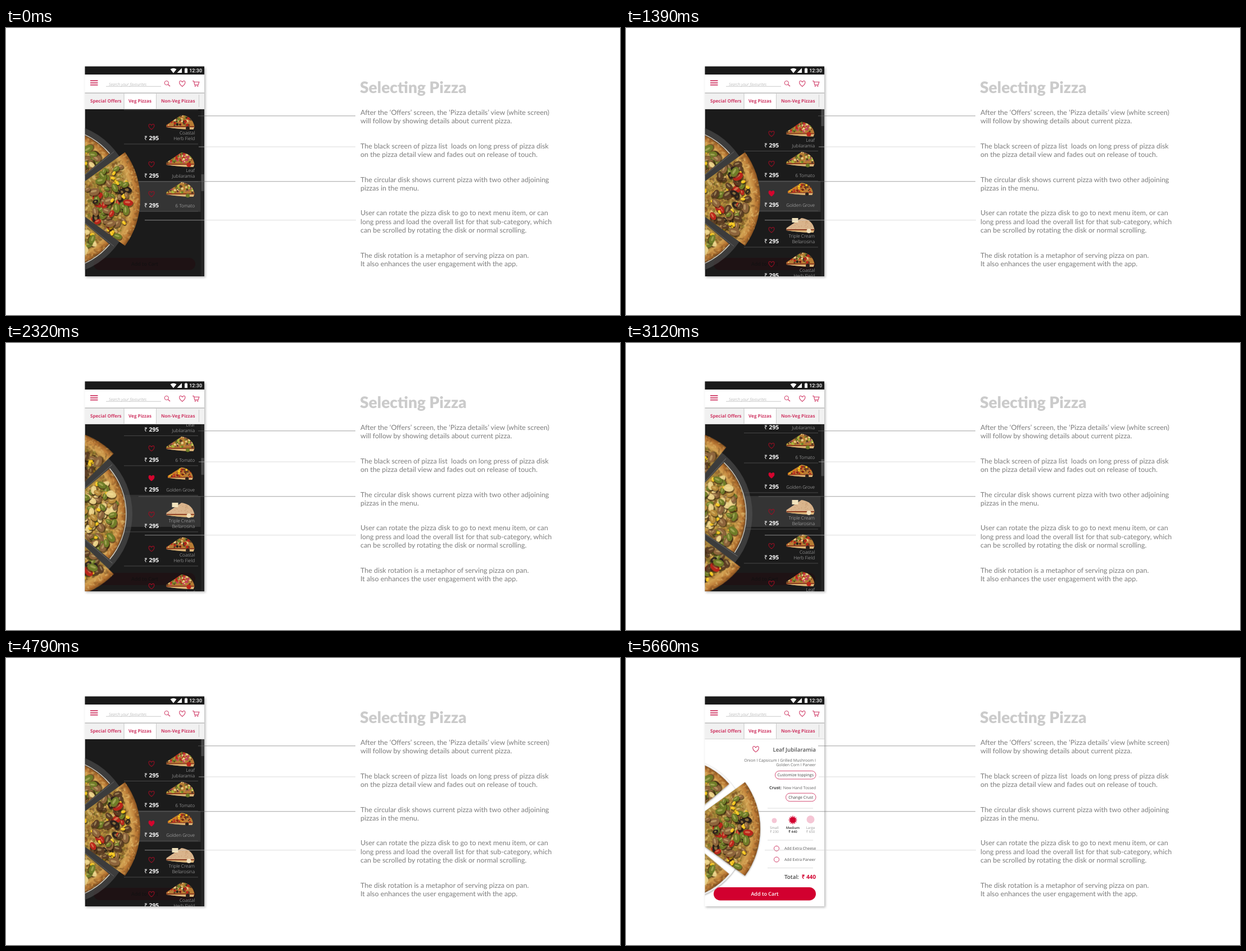
Animation, 1093 px wide and 512 px high, one loop 7.06 s. Source, as an HTML page with a canvas:

```html
<!DOCTYPE html>
<html lang="en">
<head>
<meta charset="utf-8">
<title>Selecting Pizza</title>
<style>
  html, body { margin: 0; width: 100%; height: 100%; overflow: hidden; background: #fff; }
  canvas { display: block; }
</style>
</head>
<body>
<canvas id="stage" width="1093" height="512"></canvas>
<script>
const LOOP = 7060;
const ctx = document.getElementById('stage').getContext('2d');
ctx.textRendering = 'geometricPrecision';
const CRIMSON = '#d2002f', PINK = '#d03a66', SANS = '"Open Sans", sans-serif';
const LEFT = 140.5, WIDTH = 212.5;
const rad = deg => deg * Math.PI / 180;
const smooth = u => { u = Math.min(1, Math.max(0, u)); return u * u * (3 - 2 * u); };

function random(seed) {
  return () => (seed = (seed * 16807) % 2147483647) / 2147483647;
}

// ---------- drawing helpers ----------
function text(str, x, y, size, color, weight = 400, align = 'left', family = SANS) {
  ctx.font = `${weight} ${size}px ${family}`;
  ctx.textAlign = align;
  ctx.fillStyle = color;
  ctx.fillText(str, x, y);
}
function rect(x, y, w, h, color) {
  ctx.fillStyle = color;
  ctx.fillRect(x, y, w, h);
}
function line(x1, y1, x2, y2, color, width = 1) {
  ctx.beginPath();
  ctx.moveTo(x1, y1);
  ctx.lineTo(x2, y2);
  ctx.strokeStyle = color;
  ctx.lineWidth = width;
  ctx.stroke();
}
function circle(x, y, r, fill, stroke) {
  ctx.beginPath();
  ctx.arc(x, y, r, 0, 7);
  paint(fill, stroke);
}
function pill(x, y, w, h, fill, stroke) {
  ctx.beginPath();
  ctx.roundRect(x, y, w, h, h / 2);
  paint(fill, stroke, .9);
}
function paint(fill, stroke, width = 1) {
  if (fill) { ctx.fillStyle = fill; ctx.fill(); }
  if (stroke) { ctx.strokeStyle = stroke; ctx.lineWidth = width; ctx.stroke(); }
}
function heart(x, y, w, color, filled) {
  const s = w / 2;
  ctx.beginPath();
  ctx.moveTo(x, y + s * .9);
  ctx.bezierCurveTo(x - s * 1.5, y - s * .1, x - s * .8, y - s * 1.5, x, y - s * .45);
  ctx.bezierCurveTo(x + s * .8, y - s * 1.5, x + s * 1.5, y - s * .1, x, y + s * .9);
  paint(filled && color, color, 1.1);
}

// ---------- pizza ----------
const OLIVE = '#2b221d', CORN = '#f3c51e', RED = '#b9261b', GREEN = '#6f7d28',
      SAUSAGE = '#5c3e25', MUSHROOM = '#8d643c', CHEESE = '#e6cd85';

function makeSlice(seed, radius, half, toppings) {
  const rnd = random(seed), canvas = document.createElement('canvas');
  canvas.width = radius + 4;
  canvas.height = radius * 2;
  const c = canvas.getContext('2d');
  c.translate(0, radius);
  c.beginPath();
  c.moveTo(0, 0);
  c.arc(0, 0, radius, -rad(half), rad(half));
  c.closePath();
  c.clip();
  const base = c.createRadialGradient(0, 0, 0, 0, 0, radius);
  [[0, '#a98a3e'], [.84, '#a9843a'], [.89, '#d3a252'], [.96, '#b97633'], [1, '#85501f']]
    .forEach(stop => base.addColorStop(...stop));
  c.fillStyle = base;
  c.fillRect(0, -radius, radius, radius * 2);

  const place = (near, far) => {
    const r = radius * (near + (far - near) * Math.sqrt(rnd()));
    const a = rad(half) * (rnd() * 2 - 1) * .96;
    return [r * Math.cos(a), r * Math.sin(a)];
  };
  const blob = (x, y, a, b, turn, color) => {
    c.beginPath();
    c.ellipse(x, y, a, b, turn, 0, 7);
    c.fillStyle = color;
    c.fill();
  };
  const specks = ['#6b4520', '#ecd283', '#94602a', '#757022', '#d9a848'];
  c.globalAlpha = .5;
  for (let i = 0; i < 700; i++)
    blob(...place(.2, .86), 1 + rnd() * 3, 1 + rnd() * 2, rnd() * 3, specks[i % 5]);
  c.globalAlpha = .3;
  for (let i = 0; i < 150; i++)
    blob(...place(.8, 1), 1 + rnd() * 3, 1 + rnd(), rnd() * 3, specks[i % 3]);
  c.globalAlpha = 1;
  for (let i = 0; i < 84; i++) {
    const color = toppings[i % toppings.length], [x, y] = place(.25, .86), turn = rnd() * 3;
    const size = color === CORN ? 4 : 5 + rnd() * 5;
    blob(x + 1, y + 2, size, size * .75, turn, 'rgba(45,28,10,.55)');
    blob(x, y, size, size * .65, turn, color);
    if (color === OLIVE) blob(x, y, size * .4, size * .28, turn, '#8a6f3c');
    else blob(x - 1, y - 1, size * .55, size * .2, turn, 'rgba(255,235,160,.35)');
  }
  return { canvas, radius, half };
}

const BIG = 142, SMALL = 125, SMALL_HALF = 40, SPACING = 80;
const garden = makeSlice(11, BIG, 36, [GREEN, CORN, MUSHROOM, GREEN, OLIVE, MUSHROOM, CORN, GREEN, RED]);
const spicy = makeSlice(29, BIG, 36, [SAUSAGE, CORN, MUSHROOM, GREEN, SAUSAGE, OLIVE, CORN, RED]);
const mild = makeSlice(53, SMALL, SMALL_HALF, [GREEN, CHEESE, MUSHROOM, CORN, CHEESE, GREEN, '#b78a3a']);
const slices = [mild, spicy, mild, spicy, mild, garden, mild];   // first one sits above the front

function disk(turn, dark) {
  ctx.save();
  ctx.translate(88, 305);
  ctx.shadowColor = dark ? 'transparent' : 'rgba(0,0,0,.4)';
  ctx.shadowBlur = 3;
  ctx.shadowOffsetY = 1;
  circle(0, 0, dark ? 137 : SMALL + 3, dark ? 'rgba(82,82,82,.6)' : '#fff');
  slices.forEach((slice, i) => {
    const angle = (i - 1) * SPACING - turn;
    if (Math.abs(angle) > 140) return;
    const big = slice !== mild;
    ctx.save();
    ctx.rotate(rad(angle));
    if (big && dark) {
      for (const side of [-1, 1]) {
        const a = rad(39 * side);
        line(40, 40 * Math.tan(a), 134 * Math.cos(a), 134 * Math.sin(a), '#606060');
      }
    }
    ctx.translate(big ? 9 : 0, 0);
    ctx.drawImage(slice.canvas, 0, -slice.radius);
    if (!big) {
      ctx.shadowColor = 'transparent';
      ctx.beginPath();
      ctx.arc(0, 0, SMALL + 1, -rad(SMALL_HALF), rad(SMALL_HALF));
      paint(null, dark ? '#d6d0c2' : '#eee', 1.5);
    }
    ctx.restore();
  });
  ctx.restore();
}

// ---------- menu list ----------
const leaf = { lines: ['Leaf', 'Jubilaramia'], colors: [RED, '#c8405f', CHEESE, GREEN, SAUSAGE] };
const tomato = { lines: ['6 Tomato'], colors: ['#a9b53c', CHEESE, '#a8485a', GREEN, SAUSAGE] };
const grove = { lines: ['Golden Grove'], colors: [RED, '#d07a20', SAUSAGE, CORN, '#7a2418'], liked: true };
const cream = { lines: ['Triple Cream', 'Bellarosina'], plain: true, colors: ['#c99c72', '#ddb892'] };
const coastal = { lines: ['Coastal', 'Herb Field'], colors: [GREEN, OLIVE, RED, CHEESE, SAUSAGE] };
const rows = [[leaf, 208.5], [tomato, 262], [grove, 315], [cream, 380], [coastal, 441],
              [leaf, 508], [tomato, 561]];

function thumbnail(item, x, y) {
  const rnd = random(item.lines[0].length * 97 + 5);
  ctx.save();
  ctx.translate(x, y);
  if (item === grove) ctx.scale(.9, .85);
  ctx.beginPath();
  ctx.moveTo(-25, 5);
  ctx.lineTo(2, -13);
  ctx.quadraticCurveTo(22, -10, 25, 8);
  ctx.lineTo(23, 13);
  ctx.quadraticCurveTo(0, 13, -25, 9);
  ctx.closePath();
  paint(item.plain ? '#d9b48c' : '#b87c34');
  ctx.save();
  ctx.clip();
  rect(-25, 7, 50, 2, '#8c3b20');
  rect(-25, 9, 50, 5, '#dcb578');
  for (let i = 0; i < 90; i++) {
    const px = -24 + rnd() * 46, py = 6 - rnd() * 19;
    circle(px, py, item.plain ? .8 : 1 + rnd() * 1.5, item.colors[i % item.colors.length]);
  }
  ctx.restore();
  if (item.plain) {
    rect(-15, -13, 11, 8, '#f2e3bd');
    circle(15, 10, 4, '#f0dfba');
  } else if (item !== leaf) {
    circle(13, 11, 3.5, item === tomato ? GREEN : OLIVE);
  } else {
    circle(15, 9, 4, RED);
  }
  ctx.restore();
}

function menuRow(item, y) {
  if (y < 110 || y > 490) return;
  heart(259, y - 20, 11, item.liked ? '#d4052e' : '#a00c22', item.liked);
  text('₹', 246, y + 4, 10.3, '#fff');
  text('295', 254.5, y + 4, 10.3, '#fff', 700);
  thumbnail(item, 310.5, y - 28);
  item.lines.forEach((name, i) =>
    text(name, 336, y + 4.4 - (item.lines.length - 1 - i) * 10.2, 8.2, '#c8c8c8', 300, 'right'));
  line(210, y + 11, 342, y + 11, '#484848');
}

const scrollKeys = [[130, 245], [790, 0], [1590, 0], [2250, 54], [3120, 59], [3590, -10.5], [4000, 0]];
function scrollAt(t) {
  const next = scrollKeys.findIndex(key => key[0] > t);
  if (next === 0) return scrollKeys[0][1];
  if (next < 0) return 0;
  const [t0, a] = scrollKeys[next - 1], [t1, b] = scrollKeys[next];
  return a + (b - a) * smooth((t - t0) / (t1 - t0));
}

function listView(t) {
  const scroll = scrollAt(t), progress = Math.max(0, scroll) / 245;
  rect(LEFT, 145, WIDTH, 298, '#1b1b1b');
  pill(156, 410, 181, 22, '#1e1214');
  text('Add to Cart', 247, 424, 8.8, '#131112', 600, 'center');
  rect(LEFT, 273, 206, 55, '#343434');
  rows.forEach(([item, y]) => menuRow(item, y - scroll));
  disk(320 * progress ** .917, true);
  rect(347, 145, 6, 298, '#242424');
  rect(347.5, 145 + 116 * progress ** .436, 5, 30, '#484848');
}

// ---------- detail view ----------
function detailView() {
  rect(LEFT, 145, WIDTH, 298, '#fff');
  disk(320, false);
  heart(231, 162.5, 12, PINK);
  text('Leaf Jubilaramia', 338, 166.5, 9.8, '#555', 600, 'right');
  text('Onion I Capsicum I Grilled Mushroom I', 338, 185, 7.1, '#666', 400, 'right');
  text('Golden Corn I Paneer', 338, 193.3, 7.1, '#666', 400, 'right');
  pill(265.5, 201.5, 72.5, 14.5, null, PINK);
  text('Customize toppings', 301.7, 211.2, 7, '#444', 400, 'center');
  text('Crust:', 255, 233.6, 7.4, '#444', 700);
  text('New Hand Tossed', 338, 233.6, 7, '#666', 400, 'right');
  pill(284.5, 241.2, 53.5, 14.5, null, PINK);
  text('Change Crust', 311.2, 251, 7, '#444', 400, 'center');
  [268, 325, 374.5].forEach(y => line(252, y, 333, y, '#ddd'));

  circle(264, 290, 4.5, '#f5c6d5');
  circle(328.5, 288, 7, '#f5c6d5');
  circle(297, 289, 5.6, CRIMSON);
  for (let a = 0; a < 360; a += 30)
    circle(297 + 6.5 * Math.cos(rad(a)), 289 + 6.5 * Math.sin(rad(a)), .9, CRIMSON);
  [['Small', '230', 264], ['Medium', '440', 297], ['Large', '650', 328.5]].forEach(([size, cost, x], i) => {
    const color = i === 1 ? '#333' : '#999', weight = i === 1 ? 600 : 400;
    text(size, x, 304.7, 6.1, color, weight, 'center');
    text('₹ ' + cost, x, 312, 6.1, color, weight, 'center');
  });
  [['Add Extra Cheese', 339.8], ['Add Extra Paneer', 359.5]].forEach(([label, y]) => {
    circle(268, y, 4.5, '#fff', PINK);
    text(label, 282, y + 2.5, 6.9, '#555');
  });
  text('Total:', 282, 394, 9.8, '#444', 600);
  text('₹ 440', 338, 394, 10, CRIMSON, 700, 'right');
  pill(156, 409, 182, 23.5, CRIMSON);
  text('Add to Cart', 247, 423.5, 9, '#fff', 600, 'center');
}

// ---------- fixed parts ----------
function header() {
  rect(LEFT, 68.5, WIDTH, 14.5, '#1a1a1a');
  ctx.beginPath();
  ctx.moveTo(298, 80.5);
  ctx.lineTo(292.5, 73.5);
  ctx.quadraticCurveTo(298, 69.8, 303.5, 73.5);
  ctx.closePath();
  paint('#fff');
  ctx.beginPath();
  ctx.moveTo(304.5, 80);
  ctx.lineTo(313, 80);
  ctx.lineTo(313, 71.5);
  ctx.closePath();
  paint('#fff');
  rect(318, 72.3, 5, 7.9, '#fff');
  rect(319.3, 71.3, 2.4, 1, '#fff');
  text('12:30', 349, 79.3, 9, '#fff', 500, 'right', 'Roboto, sans-serif');

  rect(LEFT, 83, WIDTH, 32, '#fff');
  [94, 97.8, 101.6].forEach(y => line(150, y, 163.5, y, PINK, 1.8));
  text('Search your favourites', 183, 102.8, 7.1, '#999', 'italic 300');
  line(178, 104.2, 276, 104.2, '#bbb', .8);
  circle(285.8, 98, 3.6, null, PINK);
  line(288.5, 100.7, 292, 104, PINK, 1.2);
  heart(313.8, 99, 11.5, PINK);
  ctx.beginPath();
  ctx.moveTo(332, 94.5);
  ctx.lineTo(334.2, 94.5);
  ctx.lineTo(336, 101.6);
  ctx.lineTo(342, 101.6);
  ctx.lineTo(343.8, 96.3);
  ctx.lineTo(334.8, 96.3);
  paint(null, PINK, 1.1);
  circle(336.8, 103.8, 1, PINK);
  circle(341.3, 103.8, 1, PINK);

  rect(LEFT, 115, WIDTH, 30, '#f1f1f1');
  rect(LEFT, 115, WIDTH, 2, '#c9c9c9');
  rect(211, 117, 56, 28, '#fff');
  [210, 267.5, 343.5].forEach((x, i) => line(x, i < 2 ? 117 : 119, x, i < 2 ? 144 : 141, '#ccc'));
  line(LEFT, 144.5, 353, 144.5, '#d5d5d5');
  text('Special Offers', 150, 133, 8.1, PINK, 700);
  text('Veg Pizzas', 218, 133, 8.1, PINK, 700);
  text('Non-Veg Pizzas', 276, 133, 8.1, PINK, 700);
}

const paragraphs = [
  [155, 'After the ‘Offers’ screen, the ‘Pizza details’ view (white screen)',
    'will follow by showing details about current pizza.'],
  [215, 'The black screen of pizza list  loads on long press of pizza disk',
    'on the pizza detail view and fades out on release of touch.'],
  [274.7, 'The circular disk shows current pizza with two other adjoining', 'pizzas in the menu.'],
  [334.4, 'User can rotate the pizza disk to go to next menu item, or can',
    'long press and load the overall list for that sub-category, which',
    'can be scrolled by rotating the disk or normal scrolling.'],
  [409.6, 'The disk rotation is a metaphor of serving pizza on pan.',
    'It also enhances the user engagement with the app.']
];

function notes() {
  text('Selecting Pizza', 630, 115.5, 28.2, '#cbcbcb', 900, 'left', 'Lato, sans-serif');
  paragraphs.forEach(([y, ...lines]) => lines.forEach((str, i) =>
    text(str, 631, y + i * 15.2, 12.45, '#7d7d7d', 400, 'left', 'Lato, sans-serif')));
  const strong = 'rgba(110,110,110,.65)', soft = 'rgba(200,200,200,.65)';
  line(342, 156.8, 622, 156.8, strong);
  line(343, 212, 622, 212, soft);
  line(236, 273.8, 622, 273.8, strong);
  line(247, 342.8, 623, 342.8, soft);
}

function frame(now) {
  const t = now % LOOP, reveal = smooth((t - 4790) / 670);
  rect(0, 0, 1093, 512, '#fff');
  ctx.save();
  ctx.shadowColor = 'rgba(0,0,0,.28)';
  ctx.shadowBlur = 4;
  ctx.shadowOffsetX = ctx.shadowOffsetY = 1.5;
  rect(LEFT, 69, WIDTH, 374, '#fff');
  ctx.restore();

  ctx.save();
  ctx.beginPath();
  ctx.rect(LEFT, 145, WIDTH, 298);
  ctx.clip();
  if (reveal < 1) listView(t);
  ctx.globalAlpha = reveal;
  ctx.drawImage(detail, 0, 0);
  ctx.restore();
  header();
  notes();
  requestAnimationFrame(() => frame(performance.now() - start));
}

// The detail view never changes, so it is painted once and blended as a picture.
const detail = Object.assign(document.createElement('canvas'), { width: 1093, height: 512 });
detailView();
detail.getContext('2d').drawImage(ctx.canvas, 0, 0);
const start = performance.now();
frame(0);
</script>
</body>
</html>
```
